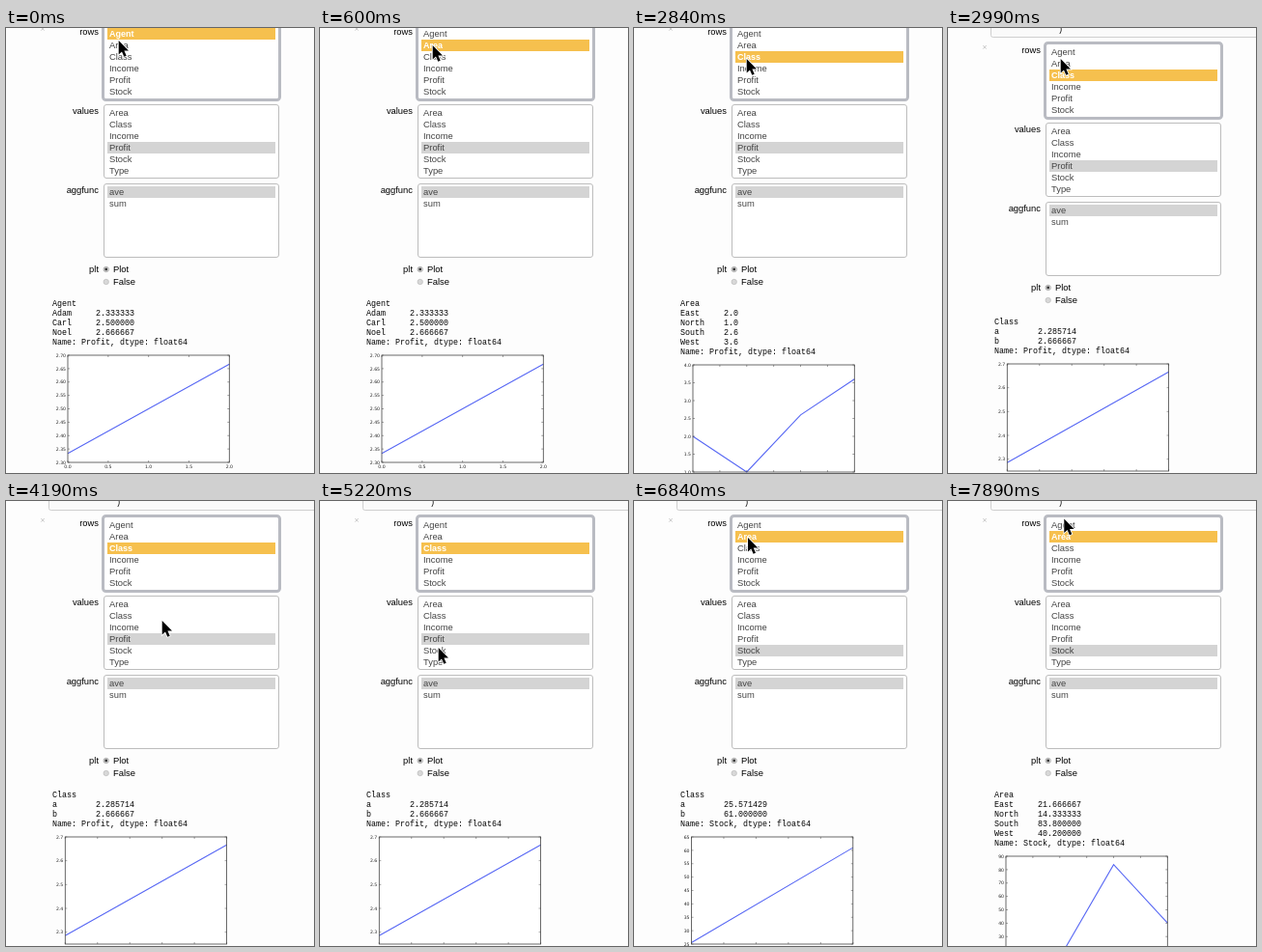
These frames come from a looping animation (319 px wide and 461 px high, 8 s). An HTML page:

```html
<!DOCTYPE html>
<html lang="en">
<head>
<meta charset="utf-8">
<title>Interactive pivot</title>
<style>
html, body { margin: 0; width: 100%; height: 100%; overflow: hidden; background: #fdfdfd; }
svg { display: block; width: 100vw; height: 100vh; }
text { font: 9.4px "Liberation Sans", Arial, sans-serif; fill: #000; white-space: pre; }
.option { fill: #444; }
.active { fill: #fff; font-weight: bold; font-size: 9px; }
.mono { font: 8.333px "Liberation Mono", "Courier New", monospace; }
.tick { font: 4.6px "DejaVu Sans", sans-serif; fill: #222; }
.end { text-anchor: end; }
.mid { text-anchor: middle; }
</style>
</head>
<body>
<svg viewBox="0 0 319 461">
  <g id="page"></g>
  <path id="cursor" d="M0 0V14.6L3.3 11.5L5.6 16.8L8 15.7L5.7 10.6H10.3Z" fill="#000" stroke="#fff" stroke-width="1.6" paint-order="stroke"/>
</svg>
<script>
const LOOP = 8000;
const ROWS = ["Agent", "Area", "Class", "Income", "Profit", "Stock"];
const VALUES = ["Area", "Class", "Income", "Profit", "Stock", "Type"];

const series = (index, labels, values, name, digits, left, min, max, step) =>
  ({ index, labels, values, name, digits, left, min, max, step });
const REGIONS = ["East", "North", "South", "West"];
const OUTPUTS = {
  agent: series("Agent", ["Adam", "Carl", "Noel"], [7 / 3, 2.5, 8 / 3], "Profit", 6, 64, 2.3, 2.7, 0.05),
  area: series("Area", REGIONS, [2, 1, 2.6, 3.6], "Profit", 1, 61, 1, 4, 0.5),
  group: series("Class", ["a", "b"], [16 / 7, 8 / 3], "Profit", 6, 61.3, 2.25, 2.7, 0.1),
  groupStock: series("Class", ["a", "b"], [179 / 7, 61], "Stock", 6, 59.5, 25, 65, 5),
  areaStock: series("Area", REGIONS, [65 / 3, 43 / 3, 83.8, 40.2], "Stock", 6, 60, 10, 90, 10),
};

// Each entry changes only the listed parts of the page.
const STATES = [
  { at: 0, row: 0, value: 3, focus: "rows", scroll: -19, output: "agent", plot: true },
  { at: 600, row: 1 },
  { at: 1050, output: "area" },
  { at: 2840, row: 2 },
  { at: 2990, scroll: 0, output: "group" },
  { at: 5360, value: 4, focus: "values" },
  { at: 5660, output: "groupStock", plot: false },
  { at: 5810, plot: true },
  { at: 6840, row: 1, focus: "rows" },
  { at: 7290, output: "areaStock" },
];

const POINTER = [
  [0, 116.7, 13], [150, 116.5, 16], [300, 116.7, 18],
  [1190, 116.7, 22], [1340, 116.7, 28], [1490, 116.7, 32],
  [3740, 140, 80], [3890, 161.7, 123],
  [4190, 161.7, 124], [4340, 159, 142], [4490, 152, 168], [4640, 142, 186],
  [4780, 133, 180], [4930, 127, 166], [5080, 124, 156], [5220, 122.7, 152],
  [6250, 123, 132], [6400, 121, 97], [6550, 119, 60], [6700, 118, 38],
  [7440, 118, 36], [7590, 119, 30], [7740, 120, 22], [7890, 120.3, 18.5],
];

const text = (x, y, str, cls = "") => `<text x="${x}" y="${y}" class="${cls}">${str}</text>`;
const rect = (x, y, w, h, attrs) => `<rect x="${x}" y="${y}" width="${w}" height="${h}" ${attrs}/>`;

function listBox(label, top, options, selected, focused) {
  const border = focused
    ? rect(100.5, top - 0.5, 183, 78, 'rx="3" fill="#fff" stroke="#b9bbc2" stroke-width="3"')
    : rect(101.5, top + 0.5, 181, 76, 'rx="2.5" fill="#fff" stroke="#bdbdbd"');
  const mark = rect(105, top + 3 + 12 * selected, 174, 12, `fill="${focused ? "#f6c04e" : "#d4d4d4"}"`);
  const items = options.map((name, i) =>
    text(107, top + 12.4 + 12 * i, name, focused && i === selected ? "active" : "option"));
  return text(96, top + 9.6, label, "end") + border + mark + items.join("");
}

function radio(y, label, on) {
  return `<circle cx="103.7" cy="${y}" r="2.7" fill="${on ? "#ddd" : "#d8d8d8"}" stroke="${on ? "#999" : "#bbb"}" stroke-width=".7"/>` +
    (on ? `<circle cx="103.7" cy="${y}" r="1.4" fill="#333"/>` : "") + text(111, y + 3.3, label);
}

function chart({ values, left, min, max, step }, top) {
  const w = 167.3, h = 111, last = values.length - 1;
  const px = v => left + v / last * w;
  const py = v => top + (max - v) / (max - min) * h;
  const yDigits = step < 0.1 ? 2 : step < 1 ? 1 : 0;
  const xStep = last > 1 ? 0.5 : 0.2;
  let ticks = "", labels = "";
  for (let v = max; v > min - 1e-6; v -= step) {
    ticks += `M${left} ${py(v)}h2M${left + w} ${py(v)}h-2`;
    labels += text(left - 2, py(v) + 1.7, v.toFixed(yDigits), "tick end");
  }
  for (let v = 0; v < last + 1e-6; v += xStep) {
    ticks += `M${px(v)} ${top}v2M${px(v)} ${top + h}v-2`;
    labels += text(px(v), top + h + 6, v.toFixed(1), "tick mid");
  }
  const line = values.map((v, i) => `${px(i)},${py(v)}`).join(" ");
  return rect(left, top, w, h, 'fill="#fff"') +
    `<polyline points="${line}" fill="none" stroke="#5868f4" stroke-width="1.1"/>` +
    `<path d="${ticks}" stroke="#444" stroke-width=".5"/>` +
    rect(left, top, w, h, 'fill="none" stroke="#444" stroke-width=".8"') + labels;
}

function output(data, showPlot) {
  const top = 300;
  const lines = [
    data.index,
    ...data.labels.map((label, i) => label.padEnd(9) + data.values[i].toFixed(data.digits)),
    `Name: ${data.name}, dtype: float64`,
  ];
  return lines.map((line, i) => text(48, top + 7.4 + 10 * i, line, "mono")).join("") +
    (showPlot ? chart(data, top + 8 + 10 * lines.length) : "");
}

function drawPage(s) {
  return rect(44.5, -40, 300, 49.5, 'rx="2" fill="#fafafa" stroke="#cfcfcf"') +
    text(114, 3.5, ")", "mono") +
    '<path d="M36.3 18l3.4 3.6m0-3.6l-3.4 3.6" stroke="#bbb" stroke-width=".8"/>' +
    listBox("rows", 16, ROWS, s.row, s.focus === "rows") +
    listBox("values", 98, VALUES, s.value, s.focus === "values") +
    listBox("aggfunc", 180, ["ave", "sum"], 0, false) +
    text(96, 271.8, "plt", "end") + radio(269, "Plot", true) + radio(282, "False", false) +
    output(OUTPUTS[s.output], s.plot);
}

const page = document.getElementById("page");
const cursor = document.getElementById("cursor");
let shown = 0;

function render(t) {
  const past = STATES.filter(s => s.at <= t);
  if (past.length !== shown) {
    const state = Object.assign({}, ...past);
    page.setAttribute("transform", `translate(0 ${state.scroll})`);
    page.innerHTML = drawPage(state);
    shown = past.length;
  }
  const [, x, y] = POINTER.filter(p => p[0] <= t).pop();
  cursor.setAttribute("transform", `translate(${x} ${y})`);
}

const start = performance.now();
function tick() {
  render((performance.now() - start) % LOOP);
  requestAnimationFrame(tick);
}
tick();
</script>
</body>
</html>
```
